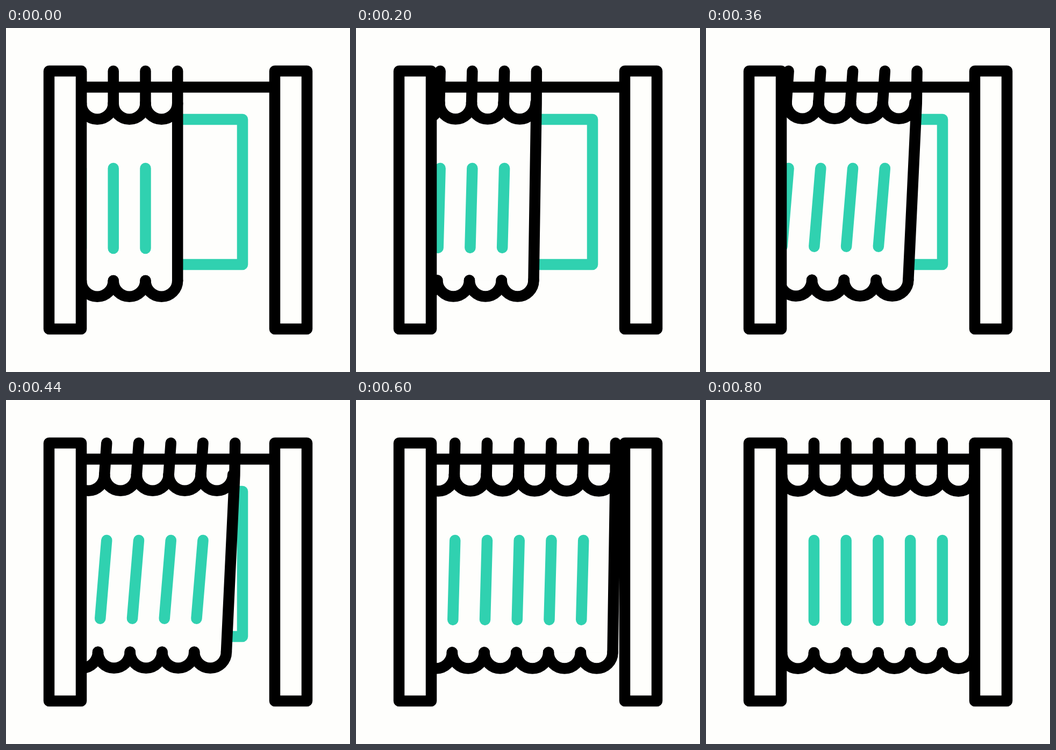
These frames come from a looping animation (640x640 px, 0.84 s). An HTML page with a canvas:

```html
<!DOCTYPE html>
<html lang="en">
<head>
<meta charset="utf-8">
<title>Curtain</title>
<style>
  html, body { margin: 0; width: 100%; height: 100%; overflow: hidden; background: #fefefc; }
  canvas { display: block; width: 640px; height: 640px; }
</style>
</head>
<body>
<canvas id="stage" width="640" height="640"></canvas>
<script>
const ctx = document.getElementById('stage').getContext('2d');
const PAPER = '#fefefc', INK = '#000', GREEN = '#30d1b0';
const LOOP = 840, STEP = 40, START = 80, END = 720;
const PITCH = 59.74, FOLDS = 6, SWAY = 17;

ctx.lineWidth = 20.5;
ctx.lineCap = ctx.lineJoin = 'round';

const smooth = u => {
  u = Math.min(1, Math.max(0, u));
  return u * u * (3 - 2 * u);
};

function line(color, ...points) {
  ctx.strokeStyle = color;
  ctx.beginPath();
  points.forEach(([x, y]) => ctx.lineTo(x, y));
  ctx.stroke();
}

// Half-circle fold hanging to the left of x
function scallop(x, y) {
  ctx.strokeStyle = INK;
  ctx.beginPath();
  ctx.arc(x - PITCH / 2, y, PITCH / 2, 0, Math.PI);
  ctx.stroke();
}

function pillar(x) {
  ctx.fillStyle = PAPER;
  ctx.fillRect(x, 80, 60, 480);
  ctx.strokeStyle = INK;
  ctx.strokeRect(x, 80, 60, 480);
}

function curtain(edge, lean) {
  const drag = SWAY * lean, lift = 1.2 * lean, hem = 470 - lift;
  const side = x => [[x, 80], [x - drag * 0.05, 140], [x - drag, hem]];

  ctx.save();
  ctx.beginPath();
  ctx.rect(140, 0, 500, 640);
  ctx.clip();

  ctx.fillStyle = PAPER;
  ctx.beginPath();
  ctx.moveTo(140, 140);
  ctx.lineTo(edge - drag * 0.05, 140);
  ctx.lineTo(edge - drag, hem);
  ctx.lineTo(140, hem);
  ctx.fill();

  line(INK, [140, 110], [500, 110]);
  line(INK, ...side(edge));
  line(INK, ...side(edge - FOLDS * PITCH));
  for (let i = 0; i < FOLDS; i++) {
    const x = edge - i * PITCH;
    scallop(x - drag / 4, 140 - lift);
    scallop(x - drag, hem);
    if (i) {
      line(INK, [x, 80], [x - drag / 4, 140 - lift]);
      line(GREEN, [x, 261], [x - drag * 0.74, 410 - 3.5 * lean]);
    }
  }
  ctx.restore();
}

function draw(now) {
  const t = Math.floor((now % LOOP) / STEP) * STEP;
  const u = (t - START) / (END - START);
  const edge = 319.2 + 180.4 * smooth(u);
  const lean = smooth(1 - Math.abs(2 * u - 1));

  ctx.fillStyle = PAPER;
  ctx.fillRect(0, 0, 640, 640);
  line(GREEN, [200, 170], [440, 170], [440, 440], [200, 440]);
  curtain(edge, lean);
  pillar(80);
  pillar(500);
}

let origin;
function frame(now) {
  origin ??= now;
  draw(now - origin);
  requestAnimationFrame(frame);
}
requestAnimationFrame(frame);
</script>
</body>
</html>
```
